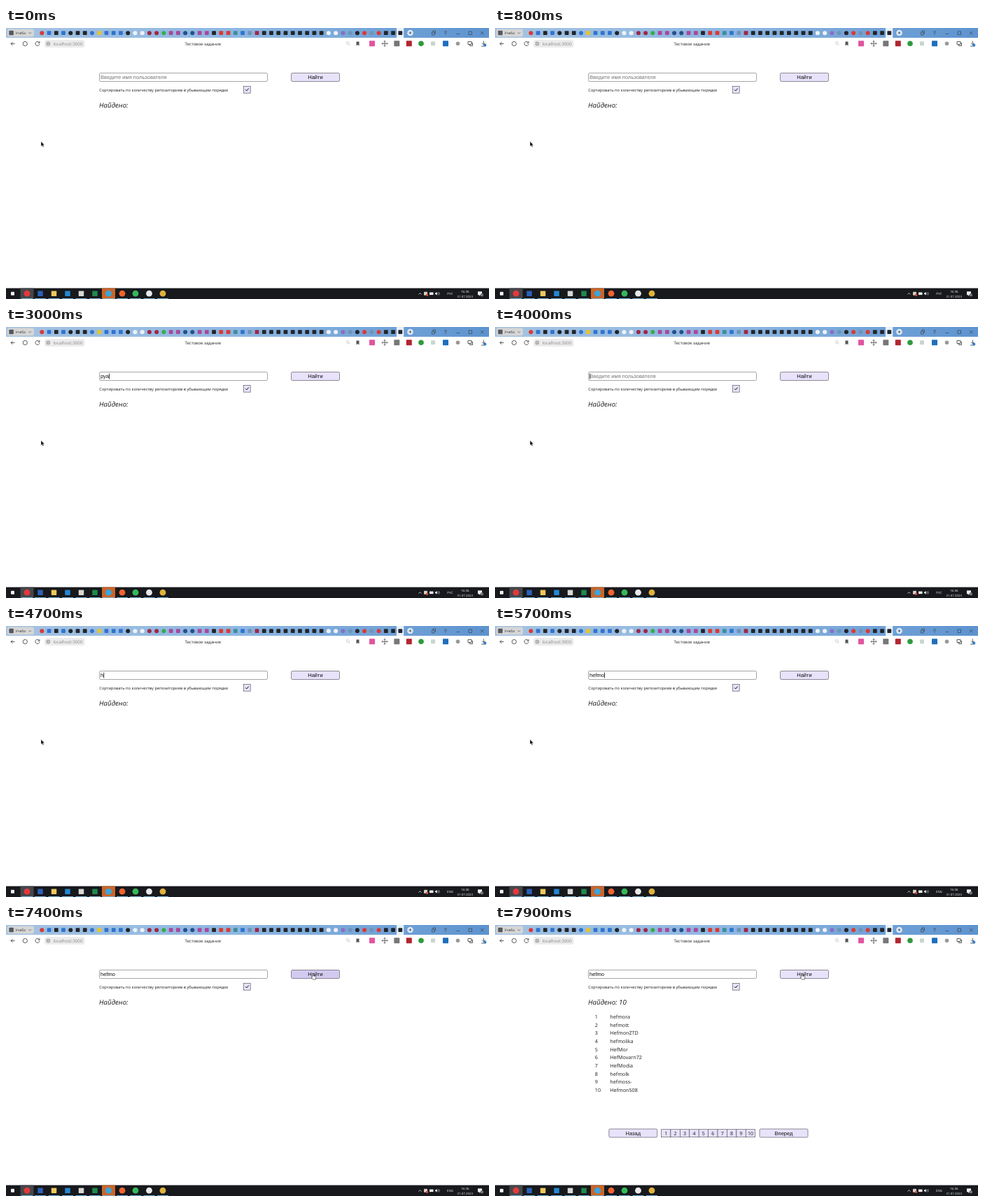
Write an HTML page that moves like this. It is 690 by 388 pixels and loops after 8 s.

```html
<!DOCTYPE html>
<html lang="ru">
<head>
<meta charset="utf-8">
<title>Тестовое задание</title>
<style>
  html, body { margin: 0; width: 100%; height: 100%; overflow: hidden; background: #fff; }
  svg {
    display: block; width: 100%; height: 100%;
    font-family: "Open Sans", "Noto Sans", sans-serif; text-rendering: geometricPrecision;
  }
  .control { font-family: "Liberation Sans", Arial, sans-serif; font-size: 7.56px; }
</style>
</head>
<body>
<svg id="stage" viewBox="0 0 690 388"></svg>
<script>
const stage = document.getElementById("stage");
const LOOP = 8000, STEP = 100, BLINK = 530;
const LILAC = "#e8e2fa", PRESSED = "#d3caf0", INK = "#1c1c1c";

const rect = (x, y, w, h, fill, extra = "") =>
  `<rect x="${x}" y="${y}" width="${w}" height="${h}" fill="${fill}" ${extra}/>`;
const circle = (x, y, r, fill, extra = "") =>
  `<circle cx="${x}" cy="${y}" r="${r}" fill="${fill}" ${extra}/>`;
const square = (x, y, size, fill) => rect(x - size / 2, y - size / 2, size, size, fill, 'rx=".8"');
const line = (d, width = .8, colour = "#333") =>
  `<path d="${d}" fill="none" stroke="${colour}" stroke-width="${width}"/>`;
const text = (x, y, str, size, fill = INK, extra = "") =>
  `<text x="${x}" y="${y}" font-size="${size}" fill="${fill}" ${extra}>${str}</text>`;
const middle = 'text-anchor="middle"';
const border = 'stroke="#55525e" stroke-width=".65"';
const button = (x, y, label, id = "") =>
  rect(x, y, 69, 12, LILAC, `id="${id}" rx="1.7" ${border}`) +
  `<text class="control" x="${x + 34.5}" y="${y + 8.9}" ${middle} fill="#111">${label}</text>`;

// Upper case letters draw squares, lower case letters draw circles.
const tabColours = {
  r: "#d93a35", b: "#2f74d0", k: "#22252b", n: "#24508c", y: "#e2c52f", w: "#eef2f6",
  d: "#9d2848", g: "#35ad4a", p: "#a8489c", t: "#3b8d9c", s: "#6d94b8", v: "#8a6fc0"
};
const tabs = "rBKBkKKbYBBBkwwddgPPnnPPKRRTBSDKKKKKKKKKwwvskrsrKKK";

function tabBar() {
  let out = rect(0, 0, 690, 14, "url(#sky)") +
    rect(2, 1.5, 38, 11, "#d6d6d6", 'rx="3"') + square(7.6, 7, 6.5, "#55585c") +
    text(13.5, 8.9, "Учеба", 5, "#333") + line("M32.5 6.3l1.8 1.8 1.8-1.8", .6) +
    rect(558, 0, 10.2, 14, "#e8f1fa");
  [...tabs].forEach((code, i) => {
    const x = 51.3 + i * 10.24, fill = tabColours[code.toLowerCase()];
    if (i < tabs.length - 1) out += rect(x + 5, 4, .4, 6.5, "#6b8fb3", 'opacity=".4"');
    out += code < "a" ? square(x, 7.2, 5.8, fill) : circle(x, 7.2, 3, fill);
  });
  return out + circle(577.5, 7, 4.3, "#dceaf7") + line("M575.5 7h4M577.5 5v4", .7) +
    line("M608.5 6h3.5v4h-3.5zM610 6v-2h3.5v4h-1.5M626 5h4M626.5 7h3M627.2 9h1.6" +
      "M643.5 8.5h4.5M661 5h4.5v4.5h-4.5zM678 5l4.5 4.5M682.5 5l-4.5 4.5", .6);
}

function addressBar() {
  return line("M12.5 22.5h-5.5M9.5 20l-2.5 2.5 2.5 2.5") +
    circle(27.3, 22.5, 3.1, "#fff", 'stroke="#444" stroke-width=".9"') +
    line("M47.4 20.7a3 3 0 1 0 .5 2.2M48 19v2.4h-2.4") +
    rect(55, 17, 57.5, 11, "#ececec", 'rx="3"') +
    circle(60.3, 22.5, 3, "#a9a9a9") + line("M57.3 22.5h6M60.3 19.5v6", .5, "#ddd") +
    text(67.5, 24.7, "localhost:3000", 6.23, "#858585") +
    text(281.3, 24.7, "Тестовое задание", 6.03, "#222", middle) +
    circle(488.3, 21.5, 1.9, "none", 'stroke="#bbb" stroke-width=".7"') +
    line("M489.6 23l1.6 1.8", .8, "#bbb") +
    `<path d="M500.5 19.5h4v6l-2-1.6-2 1.6z" fill="#555"/>` +
    square(523, 22.3, 8, "#e0559e") +
    line("M537 22.3h8M541 18.3v8M538.3 20.9l-1.4 1.4 1.4 1.4M543.7 20.9l1.4 1.4-1.4 1.4" +
      "M539.6 19.7l1.4-1.4 1.4 1.4M539.6 24.9l1.4 1.4 1.4-1.4", .7) +
    square(558.3, 22.3, 8, "#777") + square(575.8, 22.3, 8, "#b22531") +
    circle(593, 22.3, 3.8, "#2f9a3d") + square(610, 22.3, 6, "#c9d6d0") +
    square(628, 22.3, 8, "#1f6fbe") + circle(645.5, 22.3, 2.8, "#999") +
    line("M660 19.5h5v4h-5zM665 21.5h1.5v4h-4v-2") +
    line("M682.3 18.5v5M680 21.5l2.3 2.3 2.3-2.3M679 26h6") + circle(684.3, 24.5, 2, "#2d7fd6");
}

function taskbar() {
  const apps = [
    ["s", 9.5, "#f2f2f2"], ["c", 30, "#e5383b"], ["s", 49, "#2b62b8"], ["s", 68.5, "#efc95a"],
    ["s", 88, "#2488d2"], ["s", 107.5, "#d8d8d4"], ["s", 127, "#1f8a4c"], ["c", 146.5, "#38a5df"],
    ["c", 166, "#f0642f"], ["c", 185, "#34b95a"], ["c", 204.5, "#e9e9e9"], ["c", 224, "#e0b23c"]
  ];
  let out = rect(0, 372.5, 690, 15.5, "#17191d") + rect(20.5, 372.5, 19, 15.5, "#44474b") +
    rect(137, 372.5, 19, 15.5, "#c9662a");
  apps.forEach(([shape, x, fill], i) => {
    out += shape === "s" ? square(x, 380.2, i ? 7.5 : 5, fill) : circle(x, 380.2, 4.4, fill);
    if (i) out += rect(x - 8, 387, 16, 1, "#78b4dc");
  });
  return out + line("M589.5 381.5l2-2 2 2", .8, "#eee") +
    square(599.5, 380.3, 5, "#d8d0c8") + circle(601.5, 382.3, 1.7, "#d84b3e") +
    rect(605, 378.5, 5.5, 3.6, "#eee") +
    `<path d="M613 379.3h1.2l1.6-1.5v5l-1.6-1.5h-1.2z" fill="#eee"/>` +
    line("M617 379a2 2 0 0 1 0 2.6M618.4 378a3.6 3.6 0 0 1 0 4.6", .6, "#ddd") +
    text(634.5, 382, "РУС", 4.5, "#f2f2f2", `${middle} id="language"`) +
    text(655.8, 378.9, "16:36", 4.5, "#f2f2f2", middle) +
    text(655.8, 385.9, "31.07.2023", 4.4, "#f2f2f2", middle) +
    `<path d="M674 377.3h6v5h-2.5l-1.5 1.7v-1.7h-2z" fill="#eee"/>` +
    circle(679.8, 382.3, 2.2, "#777");
}

function searchForm() {
  return rect(133.5, 64.5, 240, 12, "#fff", 'rx="1.7" stroke="#767676" stroke-width=".65"') +
    `<text id="query" class="control" x="135" y="73.4"></text>` +
    `<path id="squiggle" fill="none" stroke="#e0444e" stroke-width=".6"
      d="M135 75${"q.5-.8 1 0t1 0".repeat(10)}"/>` +
    rect(0, 66.5, .8, 8, "#111", 'id="caret"') +
    button(407.5, 64.5, "Найти", "find") +
    text(133.3, 90.8, "Сортировать по количеству репозиториев в убывающем порядке", 5.73) +
    rect(339.4, 83.4, 9.8, 9.8, LILAC, border) +
    line("M342 88.3l1.7 1.7 3-3.5", 1, "#111") +
    text(133, 114, "Найдено:", 9.7, INK, 'id="found" font-style="italic"');
}

function results() {
  const users = ["hefmora", "hefmott", "HefmonZTD", "hefmolika", "HefMor",
    "HefMovarn72", "HefModia", "hefmolk", "hefmoss-", "Hefmon508"];
  const rows = users.map((name, i) => {
    const y = 134.1 + i * 11.67, x = 237.5 + i * 13.42;
    return text(142.8, y, i + 1, 7.15) + text(164.3, y, name, 7.2) +
      rect(x, 292.7, 13.42, 11, LILAC, border) +
      text(x + 6.71, 300.9, i + 1, 7.1, INK, middle);
  });
  return `<g id="results">${rows.join("")}${button(162.8, 292, "Назад")}${button(378, 292, "Вперед")}</g>`;
}

const pointers =
  `<path id="arrow" d="M0 0v7l1.6-1.4 1.1 2.5 1.2-.5-1.1-2.4h2.2z" fill="#111" stroke="#fff" stroke-width=".3"/>
   <path id="hand" d="M0 .6q.8-1.2 1.5 0v3l3 .6q.9.3.8 1.3l-.5 3.3h-3.7l-2.3-3q-.2-1.1 1.2-.5z"
     fill="#fff" stroke="#222" stroke-width=".6"/>`;

stage.innerHTML =
  `<defs><linearGradient id="sky"><stop stop-color="#a5c3e2"/>
   <stop offset=".5" stop-color="#8db7e2"/><stop offset="1" stop-color="#5d93cf"/></linearGradient></defs>` +
  rect(0, 0, 690, 388, "#fff") + tabBar() + addressBar() + searchForm() + results() + taskbar() + pointers;

const [query, squiggle, caret, find, found, list, language, arrow, hand] =
  ["query", "squiggle", "caret", "find", "found", "results", "language", "arrow", "hand"]
    .map(id => document.getElementById(id));
const show = (node, on) => node.setAttribute("visibility", on ? "visible" : "hidden");

const edits = [[-820, ""], [2100, "р"], [2300, "ру"], [2500, "руа"], [3600, "ру"], [3800, "р"],
  [4000, ""], [4700, "h"], [4900, "he"], [5200, "hef"], [5400, "hefm"], [5700, "hefmo"]];
const path = [[6400, 50, 162.4], [6500, 95, 159], [6600, 215, 141], [6700, 315.7, 120.2],
  [6900, 385, 112], [7100, 425, 107], [7300, 437, 103.5], [7400, 437.5, 69.2]];

function pointerAt(t) {
  const next = path.findIndex(p => p[0] > t);
  if (next === 0) return path[0].slice(1);
  if (next < 0) return path[path.length - 1].slice(1);
  const [t0, x0, y0] = path[next - 1], [t1, x1, y1] = path[next];
  const k = (t - t0) / (t1 - t0);
  return [x0 + (x1 - x0) * k, y0 + (y1 - y0) * k];
}

function draw(now) {
  const t = Math.floor(now % LOOP / STEP) * STEP;
  const [editTime, value] = edits.filter(e => e[0] <= t).pop();
  const clicked = t >= 7400, loaded = t >= 7900;

  query.textContent = value || "Введите имя пользователя";
  query.setAttribute("fill", value ? "#111" : "#757575");
  caret.setAttribute("x", 135.2 + (value ? query.getComputedTextLength() : 0));
  show(caret, !clicked && (t - editTime) % (2 * BLINK) < BLINK);
  show(squiggle, t >= 6100 && !clicked);

  language.textContent = t < 4400 ? "РУС" : "ENG";
  find.setAttribute("fill", clicked && t < 7600 ? PRESSED : LILAC);
  found.textContent = loaded ? "Найдено: 10" : "Найдено:";
  show(list, loaded);

  const place = `translate(${pointerAt(t).join(" ")})`;
  arrow.setAttribute("transform", place);
  hand.setAttribute("transform", place);
  show(arrow, !clicked);
  show(hand, clicked);
}

function tick() {
  draw(performance.now());
  requestAnimationFrame(tick);
}
tick();
</script>
</body>
</html>
```
